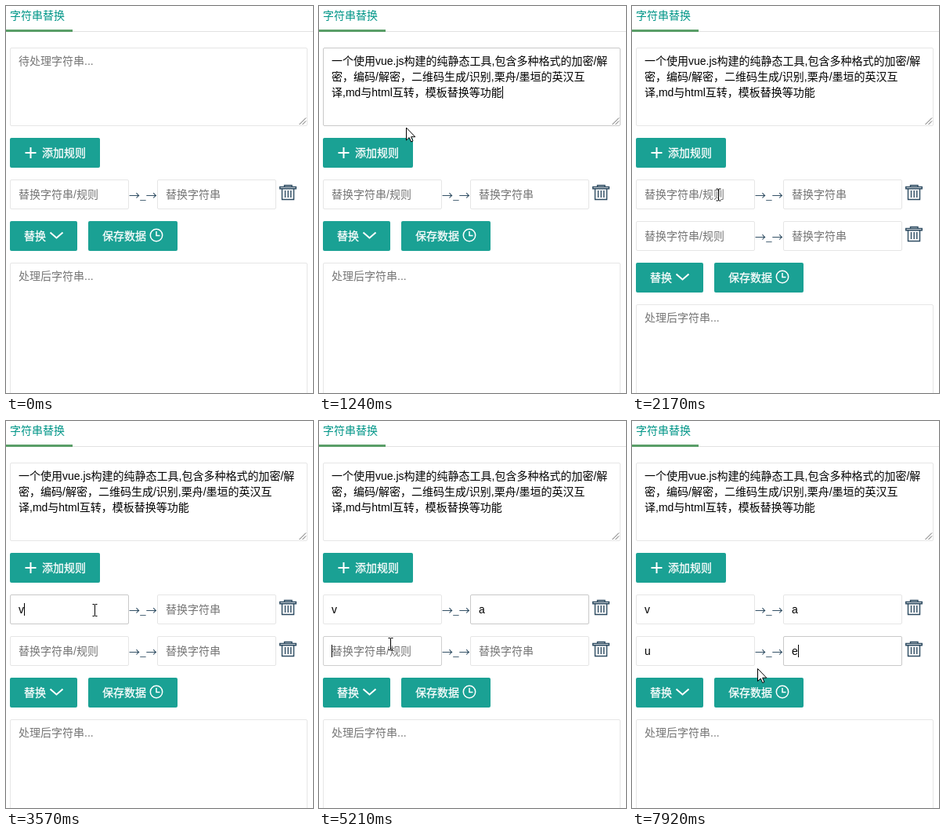
Animation, 392 px wide and 493 px high, one loop 8 s. Source, as an HTML page:

```html
<!DOCTYPE html>
<html lang="zh-CN">
<head>
<meta charset="utf-8">
<title>字符串替换</title>
<style>
html, body { margin: 0; width: 100%; height: 100%; overflow: hidden; background: #fff; }
svg { display: block; }
text { font: 14px "Liberation Sans", "Noto Sans CJK SC", "Noto Sans CJK", sans-serif; white-space: pre; }
.ph { fill: #757575; }
.box { fill: #fff; stroke: #e6e6e6; }
.btn rect { fill: #1aa194; }
.btn.hover rect { fill: #009688; }
.btn text { fill: #fff; stroke: #fff; stroke-width: .3; }
.btn path, .btn circle { fill: none; stroke: #fff; stroke-width: 1.5; }
.btn .bold { stroke-width: 2; }
.icon { fill: none; stroke: #2c4a60; stroke-width: 1.4; }
.arrows { fill: #2c4a60; font-family: "Noto Sans CJK SC", "Noto Sans CJK", sans-serif; }
.ptr { fill: #fff; stroke: #000; stroke-linejoin: round; }
</style>
</head>
<body>
<svg id="stage" width="392" height="493" viewBox="0 0 392 493"></svg>
<script>
const LOOP = 8000, ROW = 53, BLINK = 550;
const LINES = [
  '一个使用vue.js构建的纯静态工具,包含多种格式的加密/解',
  '密，编码/解密，二维码生成/识别,栗舟/墨垣的英汉互',
  '译,md与html互转，模板替换等功能'
];

const text = (x, y, s, attr = '') => `<text x="${x}" y="${y}" ${attr}>${s}</text>`;
const box = (id, x, y, w, h) =>
  `<rect id="${id}" class="box" x="${x + .5}" y="${y + .5}" width="${w - 1}" height="${h - 1}" rx="1.5"/>`;
const button = (id, x, y, w, label, labelX, icon) =>
  `<g id="${id}" class="btn"><rect x="${x}" y="${y}" width="${w}" height="38" rx="2"/>` +
  text(labelX, y + 24, label) + icon + '</g>';
const field = (id, x, y, hint) =>
  box(id, x, y, 152, 38) + text(x + 11, y + 24, hint, `id="${id}Hint" class="ph"`) +
  text(x + 11, y + 24, '', `id="${id}Text"`);
const row = (id, y) =>
  `<g id="${id}">` + field(id + 'a', 5, y, '替换字符串/规则') +
  text(157, y + 25, '→_→', 'class="arrows"') + field(id + 'b', 193, y, '替换字符串') +
  `<path class="icon" transform="translate(349 ${y})" d="M6.5 9V7.5H16V9M.7 9.5H21.3V11.8H.7ZM3.5 12V25.5H18.5V12M7.5 14V23M11.2 14V23M14.8 14V23"/></g>`;

document.getElementById('stage').innerHTML =
  text(5, 17, '字符串替换', 'fill="#009688"') +
  '<path d="M0 32.5H392" stroke="#e2e2e2"/><rect y="30" width="85" height="3" fill="#5a9e68"/>' +
  box('area', 5, 53, 380, 100) +
  '<path d="M374.5 151L383 142.5M378.5 151L383 146.5" stroke="#666" fill="none"/>' +
  text(16, 75, '待处理字符串...', 'id="areaHint" class="ph"') +
  LINES.map((s, i) => text(16, 75 + 20 * i, '', `id="line${i}"`)).join('') +
  button('add', 5, 168, 115, '添加规则', 46, '<path class="bold" d="M24.5 187H38.5M31.5 180V194"/>') +
  row('r', 221) + row('s', 221 + ROW) +
  '<g id="lower">' +
  button('run', 5, 274, 86, '替换', 23, '<path class="bold" d="M56.5 288.5L64.5 295.5L72.5 288.5"/>') +
  button('save', 105, 274, 114, '保存数据', 123,
    '<circle cx="192" cy="292" r="7.7"/><path d="M192 287V292.5H196.5"/>') +
  box('out', 5, 327, 380, 220) + text(16, 349, '处理后字符串...', 'class="ph"') + '</g>' +
  '<rect id="caret" width="1" height="16"/>' +
  '<circle id="click" r="12" fill="#ff0" opacity=".47"/>' +
  '<g id="pointer">' +
  '<path id="arrow" class="ptr" d="M.5 .5V16.5L4.2 13L6.7 18.5L9 17.5L6.6 12.2H11.8Z"/>' +
  '<path id="beam" fill="none" stroke="#000" d="M-3 -7.5H-.8L0 -7L.8 -7.5H3M0 -7V7M-3 7.5H-.8L0 7L.8 7.5H3"/>' +
  '<path id="hand" class="ptr" d="M-1.5 13V1Q-1.5 -.5 0 -.5Q1.8 -.5 1.8 1V7.5Q1.8 6 3.3 6Q5 6 5 8Q5 6.7 6.4 6.8Q8 7 8 9Q8.2 7.8 9.4 8Q10.8 8.3 10.8 10V14.5Q10.8 17 9 19.5V22H.5V20Q-1.5 18 -3.5 14.5Q-6.5 11.5 -5.5 10.3Q-4 9.2 -1.5 13ZM1.8 7.5V11.5M5 8V11.5M8 9V12"/>' +
  '</g>';

const el = id => document.getElementById(id);
const show = (id, on) => { el(id).style.display = on ? '' : 'none'; };
const clamp = v => Math.max(0, Math.min(1, v));

// each field is clicked, filled by typing or pasting, then left
const FILLS = [
  { id: 'area', click: 690, key: 1000, leave: 1800, value: LINES, pasted: true },
  { id: 'ra', click: 2320, key: 3420, leave: 4700, value: ['v'] },
  { id: 'rb', click: 4700, key: 4890, leave: 5090, value: ['a'] },
  { id: 'sa', click: 5090, key: 5840, leave: 7230, value: ['u'] },
  { id: 'sb', click: 7230, key: 7690, leave: Infinity, value: ['e'] }
];
const ADD_AT = 1850;

// pointer glides; bow swings the path downwards
const START = { x: 222, y: 301 };
const GLIDES = [
  { from: 150, to: 690, x: 112.5, y: 107 },
  { from: 1100, to: 1540, x: 110, y: 195 },
  { from: ADD_AT, to: 2170, x: 110.5, y: 240.5 },
  { from: 3420, to: 3500, x: 113.5, y: 241 },
  { from: 4050, to: 4700, x: 232, y: 241, bow: 95 },
  { from: 4920, to: 5090, x: 91.5, y: 284 },
  { from: 5900, to: 6620, x: 228.5, y: 290 },
  { from: 7740, to: 7920, x: 160, y: 315 }
];

function pointerAt(t) {
  let { x, y } = START;
  for (const g of GLIDES) {
    const k = clamp((t - g.from) / (g.to - g.from)), ease = k * (2 - k);
    x += (g.x - x) * ease;
    y += (g.y - y) * ease + (g.bow || 0) * Math.sin(Math.PI * k);
  }
  return [x, y];
}

function drawFill(f, t) {
  const full = t >= f.key;
  show(f.id + 'Hint', !full);
  f.value.forEach((s, i) => {
    el(f.pasted ? 'line' + i : f.id + 'Text').textContent = full ? s : '';
  });
  const focus = clamp((t - f.click) / 150) - clamp((t - f.leave - 150) / 100);
  const g = Math.round(230 - 29 * Math.max(0, focus));
  el(f.id).style.stroke = `rgb(${g},${g},${g})`;
}

function drawCaret(t) {
  const f = FILLS.find(f => t >= f.click && t < f.leave);
  const full = f && t >= f.key;
  const on = f && (t - (full ? f.key : f.click)) % (2 * BLINK) < BLINK;
  show('caret', on);
  if (!on) return;
  const last = el(f.pasted ? 'line' + (full ? f.value.length - 1 : 0) : f.id + 'Text');
  const end = full ? last.getComputedTextLength() : 0;
  el('caret').setAttribute('x', +last.getAttribute('x') + Math.round(end));
  el('caret').setAttribute('y', last.getAttribute('y') - 13);
}

function drawPointer(t, shift) {
  const [x, y] = pointerAt(t);
  const typing = FILLS.some(f => !f.pasted && t > f.key - 150 && t < f.key + 60);
  const visible = t >= GLIDES[0].from && !typing;
  const over = (x0, y0, x1, y1) => visible && x >= x0 && x < x1 && y >= y0 && y < y1;
  const hover = {
    add: over(5, 168, 120, 206),
    run: over(5, 274 + shift, 91, 312 + shift),
    save: over(105, 274 + shift, 219, 312 + shift)
  };
  for (const id in hover) el(id).classList.toggle('hover', hover[id]);
  const hand = hover.add || hover.run || hover.save;
  const beam = over(5, 53, 385, 153) || over(5, 221, 345, 259) || (shift && over(5, 274, 345, 312));
  show('pointer', visible);
  show('hand', hand);
  show('beam', beam);
  show('arrow', !hand && !beam);
  el('pointer').setAttribute('transform', `translate(${Math.round(x * 2) / 2} ${Math.round(y * 2) / 2})`);

  show('click', FILLS.some(f => t >= f.click && t < f.click + 115));
  el('click').setAttribute('cx', x - 2.5);
  el('click').setAttribute('cy', y - 1.5);
}

function render(t) {
  const shift = t >= ADD_AT ? ROW : 0;
  show('s', shift);
  el('lower').setAttribute('transform', `translate(0 ${shift})`);
  FILLS.forEach(f => drawFill(f, t));
  drawCaret(t);
  drawPointer(t, shift);
}

const start = performance.now();
function tick() {
  render((performance.now() - start) % LOOP);
  requestAnimationFrame(tick);
}
tick();
</script>
</body>
</html>
```
